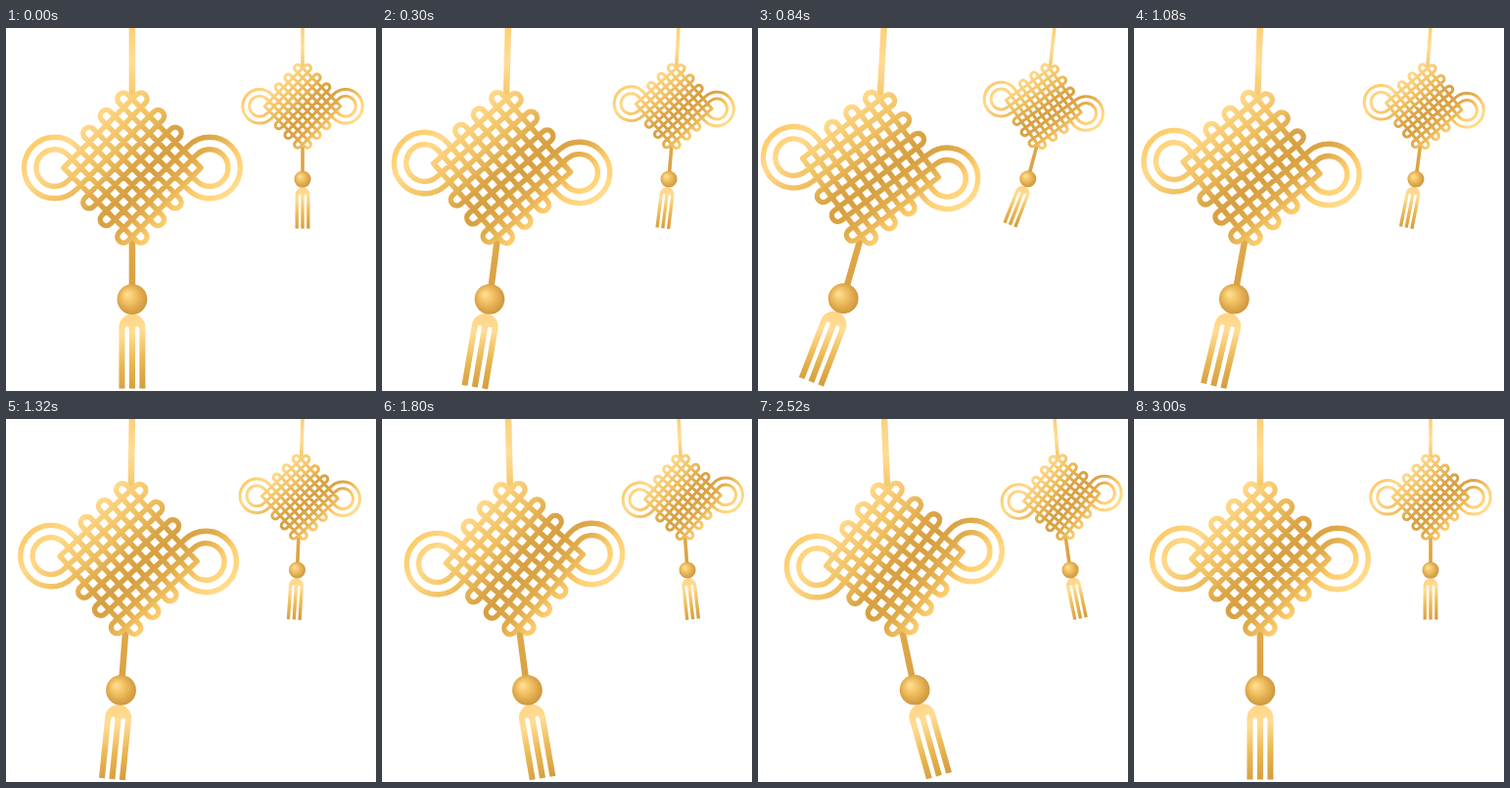
These frames come from a looping animation (378x370 px, 3.06 s). An HTML page with a canvas:

```html
<!DOCTYPE html>
<html lang="en">
<head>
<meta charset="utf-8">
<title>Swinging knots</title>
<style>
html, body { margin: 0; width: 378px; height: 370px; overflow: hidden; background: #fff; }
canvas { display: block; }
</style>
</head>
<body>
<canvas id="stage" width="378" height="370"></canvas>
<script>
const ctx = document.getElementById('stage').getContext('2d');
const STEP = 60, LOOP = 3060, SWING = 3000;
const PITCH = 12.4, REACH = 56, BALL_Y = 134;

// Each pair is [linear, quadratic] response to the swing; angles in degrees.
const knots = [
  { x: 128.9, y: 142.5, size: 1, right: 1.03,
    shift: [15.8, 0], ball: [47.4, 0], turn: [8.9, 0], tassel: [24, 0] },
  { x: 303, y: 79.8, size: 0.5545, right: 0.92,
    shift: [19.8, 3.6], ball: [36, 22.5], turn: [7, 4.3], tassel: [12, 14] }
];

function blend(g, stops) {
  stops.forEach(([at, color]) => g.addColorStop(at, color));
  return g;
}
const linear = (x0, y0, x1, y1, stops) =>
  blend(ctx.createLinearGradient(x0, y0, x1, y1), stops);

const gold = {
  knot: linear(-90, 0, 90, 0, [[0, '#fdcb68'], [0.14, '#ffd98a'], [0.34, '#f1c162'],
    [0.5, '#dba547'], [0.6, '#d79f41'], [0.72, '#e1ac4c'], [0.86, '#ffcf70'], [1, '#ffdc8d']]),
  cord: linear(0, -142, 0, -66, [[0, '#fbd07a'], [0.45, '#ffdd96'], [1, '#f3c363']]),
  tail: linear(0, 70, 0, 120, [[0, '#e0aa4b'], [1, '#d9a143']]),
  ball: blend(ctx.createRadialGradient(-5, -5, 1, -1, -1, 17),
    [[0, '#ffdd8e'], [0.4, '#f0c163'], [0.75, '#dca64a'], [1, '#cd963c']]),
  tassel: linear(-14, 18, 8, 93, [[0, '#ffd587'], [0.25, '#ffdc94'], [0.6, '#eab954'], [1, '#d39b3d']])
};

// Knot in axes turned by 45 degrees: one set of strands, then its mirror image.
function knotPath() {
  const half = new Path2D();
  const arc = (x, y, r, a, b) => {
    half.moveTo(x + r * Math.cos(a), y + r * Math.sin(a));
    half.arc(x, y, r, a, b);
  };
  for (let k = -4; k <= 4; k++) {
    half.moveTo(k === 4 ? -4 * PITCH : -REACH, k * PITCH);
    half.lineTo(k === -4 ? 4 * PITCH : REACH, k * PITCH);
  }
  for (const k of [-3.5, -1.5, 0.5]) {
    arc(-REACH, k * PITCH, PITCH / 2, Math.PI / 2, Math.PI * 1.5);
    arc(REACH, -k * PITCH, PITCH / 2, -Math.PI / 2, Math.PI / 2);
  }
  for (const n of [2, 3]) arc(-REACH, REACH, REACH - n * PITCH, 0, Math.PI * 1.5);
  const whole = new Path2D();
  whole.addPath(half);
  whole.addPath(half, new DOMMatrix([0, 1, 1, 0, 0, 0]));
  return whole;
}

function tasselPath() {
  const p = new Path2D();
  p.moveTo(-13.5, 91);
  p.lineTo(-13.5, 28.5);
  p.arc(0, 28.5, 13.5, Math.PI, 0);
  p.lineTo(13.5, 91);
  for (const x of [5.25, -5.25]) {
    p.lineTo(x + 2.2, 91);
    p.lineTo(x + 2.2, 30);
    p.arc(x, 30, 2.2, 0, Math.PI, true);
    p.lineTo(x - 2.2, 91);
  }
  p.closePath();
  return p;
}

const KNOT = knotPath(), TASSEL = tasselPath();

function line(x0, y0, x1, y1, paint) {
  ctx.strokeStyle = paint;
  ctx.lineWidth = 6.5;
  ctx.lineCap = 'butt';
  ctx.beginPath();
  ctx.moveTo(x0, y0);
  ctx.lineTo(x1, y1);
  ctx.stroke();
}

function drawKnot(k, swing) {
  const p = swing > 0 ? swing * k.right : swing;
  const bend = ([a, b]) => a * p + b * p * Math.abs(p);
  const rad = deg => -deg * Math.PI / 180;
  const shift = bend(k.shift), turn = rad(bend(k.turn));
  const ballX = bend(k.ball), ballY = BALL_Y - p * p;
  const end = r => [shift - r * Math.sin(turn), r * Math.cos(turn)];

  ctx.save();
  ctx.translate(k.x, k.y);
  ctx.scale(k.size, k.size);

  ctx.save();
  ctx.translate(ballX, ballY);
  ctx.rotate(rad(bend(k.tassel)));
  ctx.fillStyle = gold.tassel;
  ctx.fill(TASSEL);
  ctx.restore();

  line(0, -146, ...end(-70), gold.cord);
  line(...end(70), ballX, ballY, gold.tail);

  ctx.save();
  ctx.translate(shift, 0);
  ctx.rotate(turn + Math.PI / 4);
  ctx.strokeStyle = gold.knot;
  ctx.lineWidth = 5.4;
  ctx.lineCap = 'round';
  ctx.stroke(KNOT);
  ctx.restore();

  ctx.translate(ballX, ballY);
  ctx.fillStyle = gold.ball;
  ctx.beginPath();
  ctx.arc(0, 0, 15.4, 0, Math.PI * 2);
  ctx.fill();
  ctx.restore();
}

// Triangle wave: left, back, right, back.
function swingAt(ms) {
  const q = (ms % SWING) / SWING * 4;
  return q < 1 ? -q : q < 3 ? q - 2 : 4 - q;
}

const start = performance.now();
function frame() {
  const t = (performance.now() - start) % LOOP;
  const swing = swingAt(Math.floor(t / STEP) * STEP);
  ctx.fillStyle = '#fff';
  ctx.fillRect(0, 0, 378, 370);
  knots.forEach(k => drawKnot(k, swing));
  requestAnimationFrame(frame);
}
frame();
</script>
</body>
</html>
```
